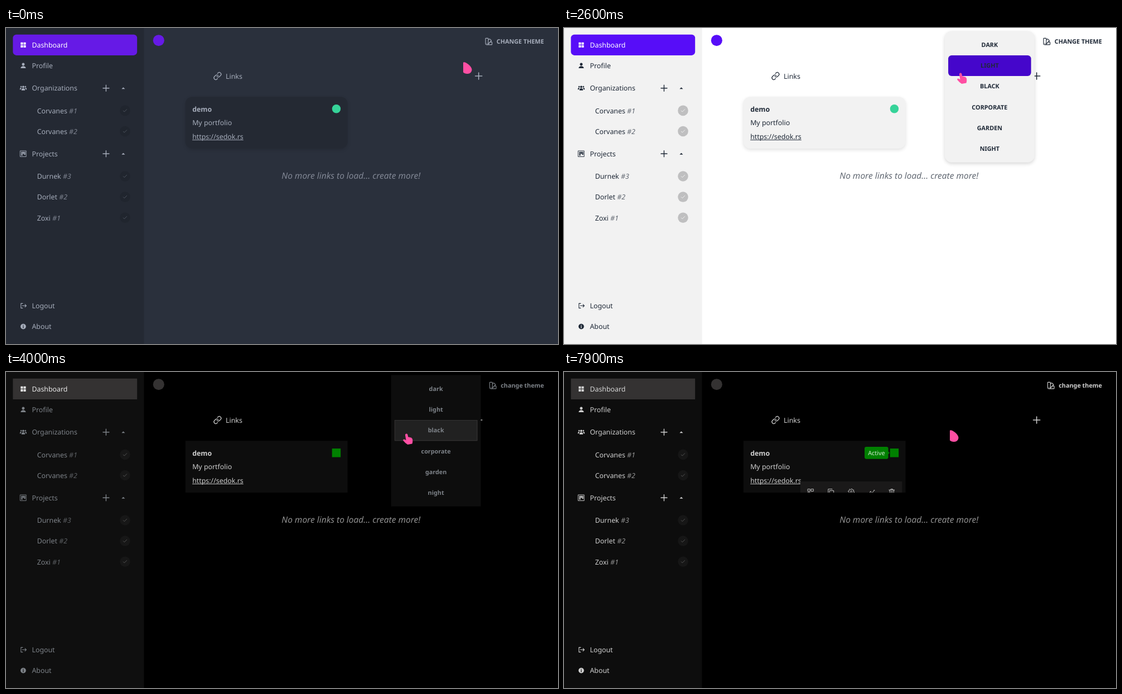
These frames come from a looping animation (990 px wide and 566 px high, 8 s). An HTML page with a canvas:

```html
<!DOCTYPE html>
<html lang="en">
<head>
<meta charset="utf-8">
<title>Dashboard themes</title>
<style>
html, body { margin: 0; width: 100%; height: 100%; overflow: hidden; background: #2a303c; }
canvas { display: block; width: 990px; height: 566px; }
</style>
</head>
<body>
<canvas id="stage" width="990" height="566"></canvas>
<script>
const ctx = document.getElementById('stage').getContext('2d');
const LOOP = 8000, STEP = 100, SCALE = 990 / 1280;
const FONT = '"Noto Sans", "Open Sans", sans-serif';
const TO_LIGHT = 1795, TO_BLACK = 3736;

// One value per theme: dark, light, black
const PALETTE = {
  page: ['#2a303c', '#ffffff', '#000000'],
  panel: ['#242933', '#f2f2f2', '#0d0d0d'],
  content: ['#a6adbb', '#1f2937', '#cfcfcf'],
  primary: ['#661ae6', '#570df8', '#343232'],
  onPrimary: ['#ffffff', '#ffffff', '#d6d6d6'],
  picked: ['#661ae6', '#570df8', '#212121'],
  pickedHover: ['#5512c4', '#4506cb', '#2b2b2b'],
  success: ['#36d399', '#36d399', '#008000'],
  badge: ['#20252e', '#bfbfc0', '#161616'],
  tick: ['#525863', '#f4f4f4', '#585858']
};
const FAST = [0, 200], MID = [0, 300], SLOW = [100, 450];

const ICONS = {
  grid: 'M3 3h8v8H3zM13 3h8v8h-8zM3 13h8v8H3zM13 13h8v8h-8z',
  person: 'M12 2.5a4.8 4.8 0 1 0 .01 0zM3 21c0-10 18-10 18 0z',
  users: 'M12 4a3.7 3.7 0 1 0 .01 0zM4.5 4.5a2.6 2.6 0 1 0 .01 0zM19.5 4.5a2.6 2.6 0 1 0 .01 0z' +
    'M6 20v-3c0-6 12-6 12 0v3zM0 17c0-6 3-7 6-5.500-1.500 1.500-2 3.500-2 5.500zM24 17c0-6-3-7-6-5.500 1.500 1.500 2 3.500 2 5.500z',
  frame: 'M3 3h18v18H3z',
  bars: 'M5.500 5.500h3.800v13H5.500zM10.200 5.500h3.800v7h-3.800zM15 5.500h3.800v10H15z',
  exit: 'M10 4H4v16h6M9 12h13M18 7.500l4.500 4.500-4.500 4.500',
  info: 'M12 2.500a9.500 9.500 0 1 0 .01 0zM10.700 10.500h2.600v7h-2.600zM10.700 6.500h2.600v2.500h-2.600z',
  link: 'M10 13a5 5 0 0 0 7.540.540l3-3a5 5 0 0 0-7.070-7.070l-1.720 1.710M14 11a5 5 0 0 0-7.540-.540l-3 3a5 5 0 0 0 7.070 7.070l1.710-1.710',
  swatch: 'M10.500 17.200a3.750 3.750 0 0 1-7.500 0V4.100Q3 3 4.100 3h5.300q1.100 0 1.100 1.100z' +
    'M10.500 8.200l2.900-2.900q.8-.8 1.600 0l3.700 3.700q.8.8 0 1.600l-9.300 9.300M6.750 21h13.100q1.100 0 1.100-1.100v-5.300q0-1.100-1.100-1.100h-4M6.600 17.200h.4',
  tick: 'M5.500 12.500l4 4 9-9',
  plus: 'M12 3v18M3 12h18',
  up: 'M4 16l8-8 8 8z',
  squares: 'M3 3h7v7H3zM14 3h7v7h-7zM3 14h7v7H3zM15 15h2v2h-2zM19 19h2v2h-2z',
  copy: 'M8 8h13v13H8zM16 4V3H3v13h1',
  gear: gearPath(),
  chart: 'M3 18l6-7 5 5 7-9M2 18h2M8 11h2M13 16h2M20 7h2',
  trash: 'M3 6h18M9 6V3h6v3M5 6l1 15h12l1-15M10 10v7M14 10v7'
};
const BLOB = new Path2D('M0 1.500Q0 0 1.800.3C7 1 15.500 8.500 15.500 13.500C15.500 18 12 21 8 21C4 21 0 19.500 0 18Z');
const HAND = new Path2D('M4 3.200C3.500.2 7.600-.4 8.400 2.400L9.300 6.800C10.500 6.200 12 6.500 12.700 7.400C14.200 7 15.300 7.600 15.700 8.700' +
  'C17 9 17.300 11 17.300 14Q17.300 16.500 16.500 18.500L8.300 20Q4 17.500.5 13C-.6 11 1.600 9.600 3.300 11L5.500 12.300Z');

const MENU = ['Dark', 'Light', 'Black', 'Corporate', 'Garden', 'Night'];
const GROUPS = [
  ['users', 'Organizations', 140, ['Corvanes #1', 'Corvanes #2']],
  ['board', 'Projects', 292, ['Durnek #3', 'Dorlet #2', 'Zoxi #1']]
];
// time, x, y, is hand
const MOVES = [
  [0, 820, 61, 0], [100, 820, 61, 0], [200, 866, 36, 1], [300, 930, 24, 1], [400, 967, 20, 1],
  [800, 967, 20, 1], [1000, 900, 42, 1], [1200, 815, 72, 1], [1400, 785, 70, 1],
  [2000, 785, 70, 1], [2400, 712, 79, 1], [2500, 712, 79, 1], [2600, 705, 80, 1], [2700, 688, 100, 1],
  [2800, 664, 135, 0], [2900, 666, 161, 0], [3000, 676, 148, 0], [3100, 696, 128, 1], [3300, 712, 110, 1],
  [4100, 712, 110, 1], [4400, 712, 138, 1], [5400, 712, 138, 1], [5500, 660, 106, 0], [5600, 625, 88, 0],
  [6200, 625, 88, 0], [6600, 596, 130, 0], [7000, 588, 140, 0],
  [7600, 588, 140, 0], [7700, 600, 136, 0], [7900, 692, 104, 0]
];
// hovered thing, from, to
const HOVERS = [['button', 180, 850], [1, 1150, 2650], [2, 3060, 4250], [3, 4340, 5450]];

let now = 0, black = false;

function gearPath() {
  let d = '';
  for (let i = 0; i < 32; i++) {
    const r = i % 4 < 2 ? 10 : 7.6, a = (i + .5) * Math.PI / 16;
    d += (i ? 'L' : 'M') + (12 + r * Math.cos(a)).toFixed(2) + ' ' + (12 + r * Math.sin(a)).toFixed(2);
  }
  return d + 'zM12 9a3 3 0 1 0 .01 0z';
}

// cubic-bezier(.4, 0, .2, 1)
function ease(x) {
  if (x <= 0) return 0;
  if (x >= 1) return 1;
  let lo = 0, hi = 1, s;
  for (let i = 0; i < 20; i++) {
    s = (lo + hi) / 2;
    const v = 1.2 * s * (1 - s) ** 2 + .6 * s * s * (1 - s) + s ** 3;
    if (v < x) lo = s; else hi = s;
  }
  return 3 * (1 - s) * s * s + s ** 3;
}
const ramp = (from, dur) => ease((now - from) / dur);
const pulse = (from, to, dur) => ramp(from, dur) * (1 - ramp(to, dur));
const rgb = c => [1, 3, 5].map(i => parseInt(c.slice(i, i + 2), 16));
const hex = a => '#' + a.map(v => Math.round(v).toString(16).padStart(2, '0')).join('');
function mix(a, b, k) {
  const p = rgb(a), q = rgb(b);
  return hex(p.map((v, i) => v + (q[i] - v) * k));
}
function tone(key, [delay, dur]) {
  const [a, b, c] = PALETTE[key];
  return mix(mix(a, b, ramp(TO_LIGHT + delay, dur)), c, ramp(TO_BLACK + delay, dur));
}
const tint = key => PALETTE[key][now < TO_LIGHT ? 0 : black ? 2 : 1];
const hover = id => HOVERS.reduce((k, [n, a, b]) => n === id ? Math.max(k, pulse(a, b, 150)) : k, 0);

function withAlpha(a, draw) {
  if (a <= 0) return;
  ctx.save();
  ctx.globalAlpha *= a;
  draw();
  ctx.restore();
}
function box(x, y, w, h, r, fill, shadow) {
  ctx.save();
  if (shadow) {
    ctx.shadowColor = `rgba(0,0,0,${shadow})`;
    ctx.shadowBlur = 6;
    ctx.shadowOffsetY = 2.5;
  }
  ctx.beginPath();
  ctx.roundRect(x, y, w, h, black ? 0 : r);
  ctx.fillStyle = fill;
  ctx.fill();
  ctx.restore();
}
function disc(x, y, r, fill) {
  ctx.beginPath();
  ctx.arc(x, y, r, 0, 7);
  ctx.fillStyle = fill;
  ctx.fill();
}
function icon(name, x, y, size, color, line) {
  ctx.save();
  ctx.translate(x - size / 2, y - size / 2);
  ctx.scale(size / 24, size / 24);
  const p = new Path2D(ICONS[name]);
  if (line) {
    ctx.lineWidth = line * 24 / size;
    ctx.lineCap = ctx.lineJoin = 'round';
    ctx.strokeStyle = color;
    ctx.stroke(p);
  } else {
    ctx.fillStyle = color;
    ctx.fill(p, 'evenodd');
  }
  ctx.restore();
}
function text(s, x, y, color, size = 16, style = '', align = 'left') {
  ctx.font = `${style} ${size}px ${FONT}`;
  ctx.textAlign = align;
  ctx.fillStyle = color;
  ctx.fillText(s, x, y + size * .388);
  return ctx.measureText(s).width;
}

function row(name, label, y, color) {
  if (name === 'board') {
    icon('frame', 40, y, 18, color, 1.2);
    icon('bars', 40, y, 17, color);
  } else icon(name, 40, y, 16, color, name === 'exit' ? 1.4 : 0);
  text(label, 60, y, color);
}

function sidebar() {
  const ink = tone('content', SLOW);
  ctx.fillStyle = tone('panel', MID);
  ctx.fillRect(0, 0, 320, 740);
  box(16, 16, 288, 48, 8, tone('primary', FAST));
  row('grid', 'Dashboard', 40, tone('onPrimary', SLOW));
  row('person', 'Profile', 88, ink);
  for (const [name, label, y, subs] of GROUPS) {
    row(name, label, y, ink);
    icon('plus', 232, y, 19, ink, 1.8);
    icon('up', 272, y, 12, ink);
    subs.forEach((s, i) => {
      const sy = y + 52 + i * 48, [word, num] = s.split(' ');
      const w = text(word + ' ', 72, sy, ink);
      withAlpha(.7, () => text(num, 72 + w, sy, ink, 16, 'italic'));
      disc(276, sy, 12, tone('badge', MID));
      icon('tick', 276, sy, 15, tone('tick', MID), 1.2);
    });
  }
  row('exit', 'Logout', 644, ink);
  row('info', 'About', 692, ink);
}

function card(ink) {
  box(416, 160, 376, 120, 16, tint('panel'), .12);
  text('demo', 432, 188, ink, 16, 'bold');
  text('My portfolio', 432, 220, ink);
  const w = text('https://sedok.rs', 432, 252, ink);
  ctx.fillRect(432, 259.500, w, 1.2);
  const ok = tone('success', FAST);
  if (black) box(756, 178, 20, 20, 0, ok);
  else disc(766, 188, 10, ok);

  withAlpha(ramp(6600, 200), () => {
    ctx.beginPath();
    ctx.roundRect(697, 174, 55, 28, 4);
    ctx.moveTo(752, 185);
    ctx.lineTo(755, 188);
    ctx.lineTo(752, 191);
    ctx.fillStyle = ok;
    ctx.fill();
    text('Active', 724.500, 188, '#d2e8d2', 14, '', 'center');
  });

  const shown = pulse(6390, 7790, 300);
  if (!shown) return;
  ctx.save();
  ctx.beginPath();
  ctx.rect(416, 160, 376, 120);
  ctx.clip();
  const top = 224 + 56 * (1 - shown);
  box(548, top, 236, 48, 0, '#1a1919');
  ['squares', 'copy', 'gear', 'chart', 'trash'].forEach((n, i) =>
    icon(n, 572 + i * 47, top + 24, 17, ink, 1.2));
  ctx.restore();
}

function button() {
  const ink = tone('content', SLOW), label = 'Change theme';
  ctx.font = `bold 14px ${FONT}`;
  const word = black ? label.toLowerCase() : label.toUpperCase();
  const left = 1247.500 - ctx.measureText(word).width;
  withAlpha(.2 * hover('button'), () => box(left - 44, 8, 1307.500 - left, 48, 8, ink));
  text(word, left, 31.500, ink, 14, 'bold');
  icon('swatch', left - 18, 32, 20, ink, 1.5);
}

function pressScale(i) {
  if (i === 1) return 1 - .05 * pulse(1550, 1810, 150);
  if (i === 2) return 1 - .05 * pulse(3550, 3736, 150);
  return 1;
}

function menu() {
  if (now < 700 || now >= 5900) return;
  withAlpha(ramp(660, 200), () => {
    const x = black ? 893 : 883, ink = tone('content', SLOW);
    const light = ramp(TO_LIGHT, 200), dark = ramp(TO_BLACK, 200);
    const picked = [1 - light, light * (1 - dark), dark];
    box(x, 8, 208, 304, 16, tone('panel', FAST), .16);
    MENU.forEach((name, i) => {
      const y = 40 + i * 48, k = hover(i), sel = picked[i] || 0;
      ctx.save();
      ctx.translate(x + 104, y);
      ctx.scale(pressScale(i), pressScale(i));
      withAlpha(.2 * k, () => box(-96, -24, 192, 48, 8, tone('content', FAST)));
      withAlpha(sel, () => {
        const fill = i === 2 ? PALETTE.picked[2] : mix(PALETTE.picked[i], PALETTE.pickedHover[i], k);
        box(-96, -24, 192, 48, 8, fill);
        if (black) {
          ctx.lineWidth = 1.3;
          ctx.strokeStyle = tone('primary', FAST);
          ctx.strokeRect(-95.350, -23.350, 190.700, 46.700);
        }
      });
      let white = 0;
      if (i === 1) white = pulse(1550, 1810, 200);
      if (i === 2) white = .62 * pulse(3720, 3850, 80);
      text(black ? name.toLowerCase() : name.toUpperCase(), 0, -.5, mix(ink, '#ffffff', white), 14, 'bold', 'center');
      ctx.restore();
    });
  });
}

function cursor() {
  let i = MOVES.length - 1;
  while (MOVES[i][0] > now) i--;
  const a = MOVES[i], b = MOVES[i + 1] || a;
  const k = b === a ? 0 : (now - a[0]) / (b[0] - a[0]);
  ctx.save();
  ctx.translate(a[1] + (b[1] - a[1]) * k, a[2] + (b[2] - a[2]) * k);
  ctx.fillStyle = '#ff4fa3';
  ctx.fill(a[3] ? HAND : BLOB);
  ctx.restore();
}

function draw(t) {
  now = Math.floor(t % LOOP / STEP) * STEP;
  black = now >= TO_BLACK;
  ctx.setTransform(1, 0, 0, 1, 0, 0);
  ctx.fillStyle = tint('page');
  ctx.fillRect(0, 0, 990, 566);
  ctx.setTransform(SCALE, 0, 0, SCALE, 0, -.6);
  ctx.textRendering = 'geometricPrecision';

  const ink = tone('content', MID);
  sidebar();
  disc(354, 29.500, 13, tone('primary', FAST));
  icon('link', 490.500, 112, 20, ink, 1.6);
  text('Links', 509.400, 112, ink);
  icon('plus', 1096, 112, 21, ink, 2);
  card(ink);
  withAlpha(.7, () => text('No more links to load... create more!', 800, 342, ink, 20, 'italic', 'center'));
  button();
  menu();

  ctx.setTransform(1, 0, 0, 1, 0, 0);
  cursor();
}

const start = performance.now();
function tick() {
  draw(performance.now() - start);
  requestAnimationFrame(tick);
}
tick();
</script>
</body>
</html>
```
